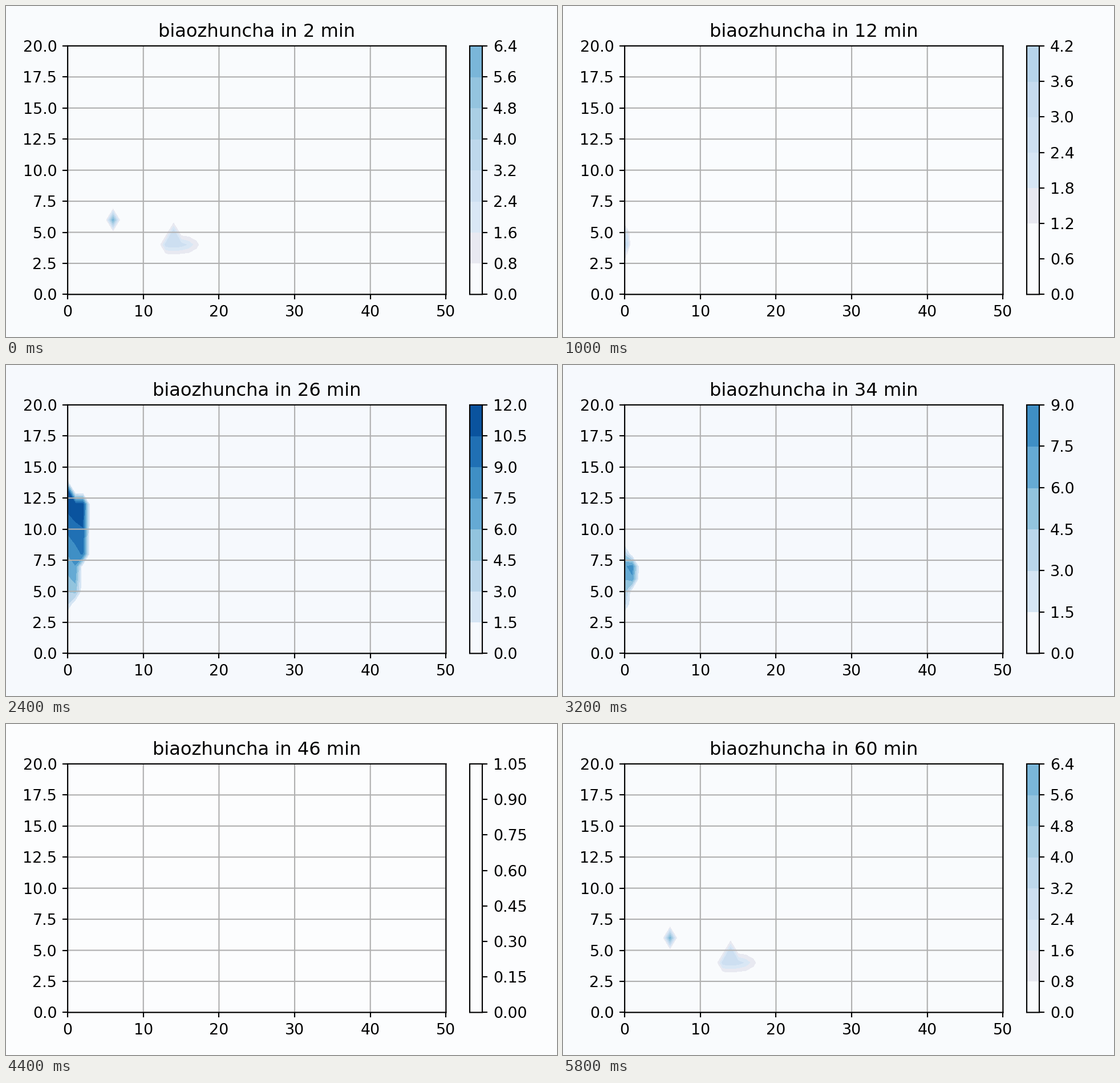
These frames come from a looping animation (966x580 px, 6000 ms). A matplotlib script:

```python
import numpy as np
import matplotlib.pyplot as plt
from matplotlib.animation import FuncAnimation
from matplotlib.colors import ListedColormap

W, H, DPI = 966, 580, 200
FRAMES, STEP_MS = 30, 200
VMAX = 13                     # value at the dark end of the colour map
FAINT, PALE = 1.1, 1.8        # limits of the page-coloured and greyish bands
LEFT, RIGHT, TOP, BOTTOM = 108.1, 771.4, 69.9, 505.4

# A 5 x 3 inch layout shrunk to the stage: text and lines scale together
plt.rcParams["font.family"] = "DejaVu Sans"
plt.rcParams["path.snap"] = False
for key in ["font.size", "axes.linewidth", "axes.titlepad", "grid.linewidth",
            "xtick.major.size", "xtick.major.width", "xtick.major.pad",
            "ytick.major.size", "ytick.major.width", "ytick.major.pad"]:
    plt.rcParams[key] *= W / (5 * DPI)


def field(*ramps):
    """Zero grid with columns x that rise from v0 at y0 to v1 at y1."""
    z = np.zeros((21, 51))
    for x, y0, y1, v0, v1 in ramps:
        u = np.linspace(0, 1, y1 - y0 + 1) ** 0.85
        z[y0:y1 + 1, x] = v0 + (v1 - v0) * u
    return z


# One spike and a rounded row with a peak above it
arrival = field((6, 6, 6, 6.1, 6.1), (14, 5, 5, 3.1, 3.1))
row = np.arange(13, 18)
arrival[4, row] = 3.05 * (1 - ((row - 14) / 3.8) ** 2)

# The queue at the left edge as it grows and clears
edge = field((0, 3, 4, 1.4, 4.1), (0, 5, 5, 3, 3))
growing = field((0, 3, 8, 2.5, 7.1), (1, 4, 8, 4.8, 7.1), (2, 7, 7, 6.6, 6.6))
peak = field((0, 4, 13, 3.2, 11.9), (1, 5, 12, 5.2, 11.6),
             (2, 8, 12, 9.2, 11.4))
fading = field((0, 4, 7, 3.5, 7.1), (0, 8, 8, 4.2, 4.2), (1, 6, 7, 7.1, 8.3))
empty = field()

KEYS = {0: arrival, 3: empty, 5: edge, 9: growing, 12: peak, 16: fading,
        18: empty, 20: edge * 0.5, 22: edge * 0.24, 23: empty,
        24: arrival * 0.4, 29: arrival}


def data_at(k):
    a = max(t for t in KEYS if t <= k)
    b = min(t for t in KEYS if t >= k)
    u = (k - a) / max(b - a, 1)
    return KEYS[a] * (1 - u) + KEYS[b] * u


def page_color(step):
    """Page tint, slightly deeper for wider bands."""
    tint = np.array([252.5, 253.8, 254.5]) - step * np.array([4.6, 3.2, 1.3])
    return tint / 255


def make_cmap(page):
    v = np.linspace(0, VMAX, 256)
    colors = plt.get_cmap("Blues")(v / VMAX)
    colors[v < PALE, :3] = np.array([232, 233, 241]) / 255
    colors[v < FAINT, :3] = page
    return ListedColormap(colors)


def add_axes(x0, x1):
    return fig.add_axes([x0 / W, 1 - BOTTOM / H,
                         (x1 - x0) / W, (BOTTOM - TOP) / H])


fig = plt.figure(figsize=(W / DPI, H / DPI), dpi=DPI)
ax = add_axes(LEFT, RIGHT)
cax = add_axes(813, 835)


def draw(k):
    ax.clear()
    cax.clear()
    cs = ax.contourf(data_at(k), vmin=0, vmax=VMAX)
    page = page_color(cs.levels[1] - cs.levels[0])
    cs.set_cmap(make_cmap(page))
    fig.colorbar(cs, cax=cax)
    fig.set_facecolor(page)
    ax.set_facecolor(page)

    ax.set(xlim=(0, 50), ylim=(0, 20), xticks=np.arange(0, 51, 10),
           yticks=np.arange(0, 20.1, 2.5))
    ax.grid(True)
    ax.set_title(f"biaozhuncha in {2 * k + 2} min")
    return []


anim = FuncAnimation(fig, draw, frames=FRAMES, interval=STEP_MS,
                     init_func=lambda: draw(0), repeat=True, repeat_delay=0)
plt.show()
```
